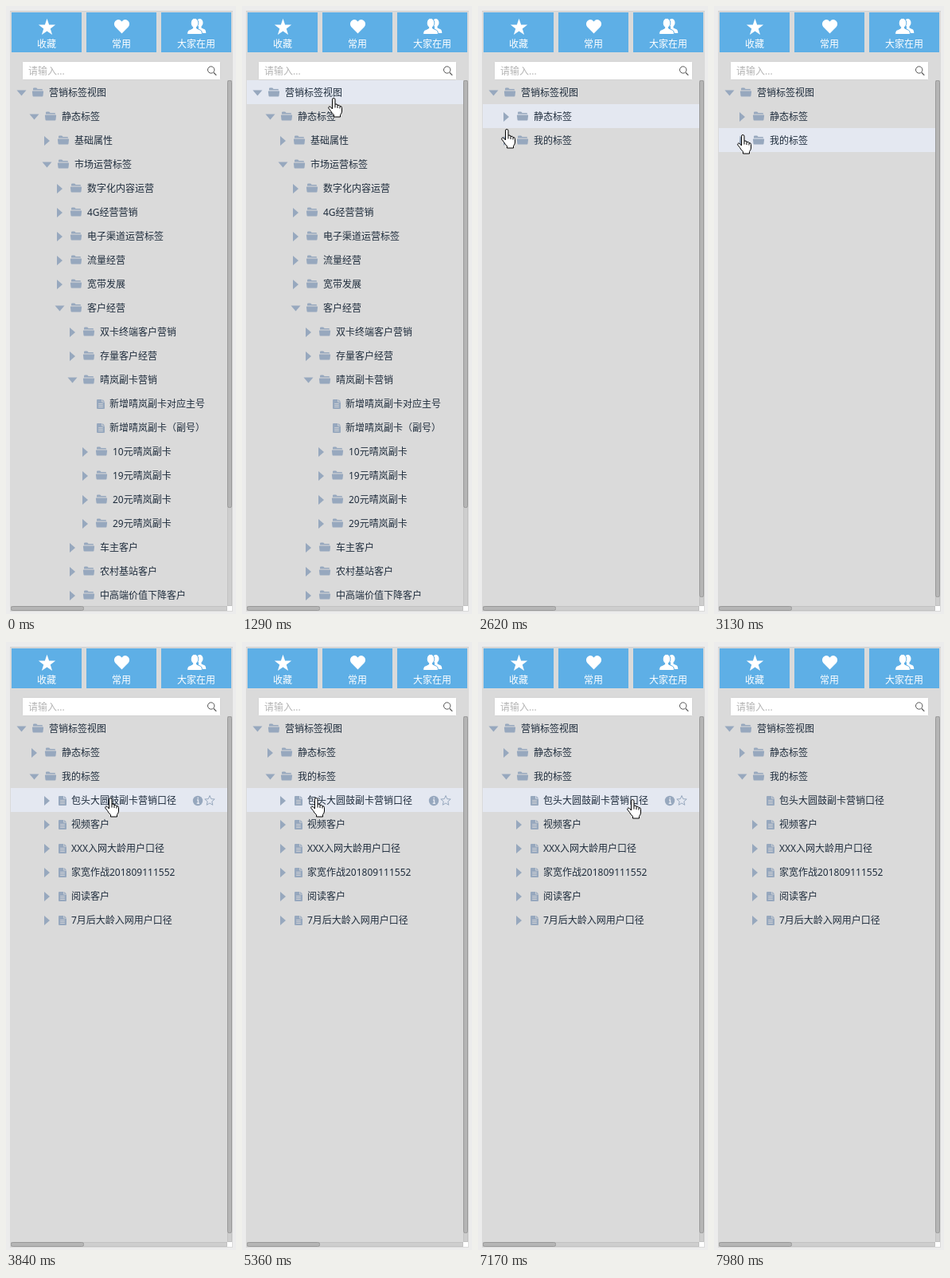
Animation, 289 px wide and 762 px high, one loop 9890 ms. Source, as an HTML page:

```html
<!DOCTYPE html>
<html lang="zh-CN">
<head>
<meta charset="utf-8">
<title>标签树</title>
<style>
  html, body { margin: 0; width: 100%; height: 100%; overflow: hidden; background: #ececec; }
  svg { display: block; width: 100vw; height: 100vh; }
  text { font: 12px "Noto Sans", "Noto Sans CJK SC", "Noto Sans CJK JP", sans-serif; fill: #1f2d3d; }
  .icon { fill: #97a8be; }
  .button text { fill: #fff; text-anchor: middle; }
  .button path, .button ellipse { fill: #fff; }
  .bar { fill: #b5b5b5; stroke: #999; }
  .track { fill: #cecece; stroke: #c2c2c2; }
</style>
</head>
<body>
<svg viewBox="0 0 289 762">
  <defs>
    <clipPath id="view"><rect x="6" y="93" width="272" height="659"/></clipPath>
    <clipPath id="staticClip"><rect id="staticBox" x="0" y="153" width="289" height="690"/></clipPath>
    <clipPath id="mineClip"><rect id="mineBox" x="0" y="30" width="289" height="0"/></clipPath>
    <g id="folder" class="icon">
      <path d="M1 3V1.2Q1 0 2.2 0H5.2L6.6 1.5H12Q13 1.5 13 2.5V3Z"/>
      <path d="M.6 4H13.4Q14.2 4 14.1 4.8L13.5 10Q13.4 11 12.4 11H1.6Q.6 11 .5 10L-.1 4.8Q-.2 4 .6 4Z"/>
    </g>
    <g id="file">
      <path class="icon" d="M1 0H6.3V3.6H10V11Q10 12 9 12H1Q0 12 0 11V1Q0 0 1 0ZM7.2 0L10 2.8H7.2Z"/>
      <path d="M2.2 5.5H7.8M2.2 7.5H7.8M2.2 9.5H7.8" stroke="#dadada" stroke-width=".8"/>
    </g>
  </defs>

  <rect x="5" y="7" width="280" height="752" fill="#dadada"/>
  <path d="M5 6.5H285" stroke="#d0d0d0"/>

  <g id="buttons" class="button"></g>

  <rect x="20.5" y="69.5" width="249" height="23" rx="1" fill="#fff" stroke="#d3d3d3"/>
  <text x="28" y="86" style="fill:#b4b4b4">请输入...</text>
  <path d="M261 83.5L264.3 86.8" stroke="#555" stroke-width="1.2"/>
  <circle cx="257.7" cy="80" r="4.2" fill="none" stroke="#555"/>

  <g clip-path="url(#view)">
    <rect id="hover" x="6" width="272" height="30" fill="#e4e8f1"/>
    <g id="top"></g>
    <g id="staticRows" clip-path="url(#staticClip)"></g>
    <g id="mine">
      <g id="mineHead"></g>
      <g id="mineRows" clip-path="url(#mineClip)"></g>
    </g>
    <g id="tools">
      <circle class="icon" cx="241" cy="199" r="6.2"/>
      <path d="M240 198H241.5V202M239.7 202.3H243M240.5 195.5H242" fill="none" stroke="#e4e8f1" stroke-width="1.4"/>
      <path id="favorite" fill="none" stroke="#97a8be"/>
    </g>
  </g>

  <rect class="track" x="278.5" y="93.5" width="5" height="658"/>
  <rect class="track" x="6.5" y="752.5" width="271" height="5"/>
  <rect x="278" y="752" width="6" height="6" fill="#fff"/>
  <rect class="bar" id="thumb" x="278.5" y="93.5" width="5" rx="2"/>
  <rect class="bar" x="6.5" y="752.5" width="91" height="5" rx="2"/>

  <g id="hand" stroke="#000" stroke-linejoin="round">
    <path fill="#fff" d="M5.5 14V2.2Q5.5 .5 7.2 .5T9 2.2V8.2Q11.8 7.2 12 9.4Q14.6 8.6 15 10.6Q17.4 10.2 17.5 12.5V17Q17.5 19 15.5 21.5V24H7.5V21.5Q5 19.5 3.5 16.5L.9 13.2Q.2 11.6 1.6 11Q3 10.4 5.5 14Z"/>
    <path fill="none" d="M9 8.2V12.5M12 9.4V13M15 10.6V13.5"/>
  </g>
</svg>
<script>
const LOOP = 9890, ROW = 30, TOP = 93, STATIC_H = 23 * ROW, MINE_H = 6 * ROW;
const $ = id => document.getElementById(id);
const set = (id, attrs) => { for (const k in attrs) $(id).setAttribute(k, attrs[k]); };
const show = (id, on) => set(id, { visibility: on ? 'visible' : 'hidden' });

function star(cx, cy, r, inner) {
  const points = [];
  for (let i = 0; i < 10; i++) {
    const a = i * Math.PI / 5, d = i % 2 ? r * inner : r;
    points.push((cx + d * Math.sin(a)).toFixed(2) + ' ' + (cy - d * Math.cos(a)).toFixed(2));
  }
  return 'M' + points.join('L') + 'Z';
}

const button = (x, label, icon) =>
  `<rect x="${x}" y="8" width="88" height="50" fill="#5eafe6"/>${icon}<text x="${x + 44}" y="52">${label}</text>`;

const arrow = (x, y, angle) => `translate(${x} ${y}) rotate(${angle})`;

// kind: 'open' or 'shut' folder, 'leaf' file, 'file' with an arrow
function row(y, level, kind, label, id = '') {
  const x = 16 * level, isFile = kind === 'leaf' || kind === 'file';
  const tri = kind === 'leaf' ? '' :
    `<path ${id && `id="${id}"`} class="icon" d="M-3.5 -6L3.5 0L-3.5 6Z" transform="${arrow(x + 19.5, y + 16, kind === 'open' ? 90 : 0)}"/>`;
  const icon = isFile ? `<use href="#file" x="${x + 34}" y="${y + 10}"/>` : `<use href="#folder" x="${x + 33}" y="${y + 9.5}"/>`;
  return `${tri}${icon}<text x="${x + (isFile ? 50 : 54)}" y="${y + 20}">${label}</text>`;
}

const staticTree = [
  [2, 'shut', '基础属性'], [2, 'open', '市场运营标签'],
  [3, 'shut', '数字化内容运营'], [3, 'shut', '4G经营营销'], [3, 'shut', '电子渠道运营标签'],
  [3, 'shut', '流量经营'], [3, 'shut', '宽带发展'], [3, 'open', '客户经营'],
  [4, 'shut', '双卡终端客户营销'], [4, 'shut', '存量客户经营'], [4, 'open', '晴岚副卡营销'],
  [5, 'leaf', '新增晴岚副卡对应主号'], [5, 'leaf', '新增晴岚副卡（副号）'],
  ...[10, 19, 20, 29].map(n => [5, 'shut', n + '元晴岚副卡']),
  [4, 'shut', '车主客户'], [4, 'shut', '农村基站客户'], [4, 'shut', '中高端价值下降客户']
];
const mineTree = ['包头大圆鼓副卡营销口径', '视频客户', 'XXX入网大龄用户口径',
  '家宽作战201809111552', '阅读客户', '7月后大龄入网用户口径'];

$('buttons').innerHTML =
  button(7, '收藏', `<path d="${star(51.5, 27, 11.2, .4)}"/>`) +
  button(101, '常用', '<path d="M145.5 34.5L137.3 26.3Q134.6 22.5 137.2 19Q141.5 15 145.5 19.5Q149.5 15 153.8 19Q156.4 22.5 153.7 26.3Z"/>') +
  button(195, '大家在用',
    '<ellipse cx="243.5" cy="21" rx="4" ry="5"/><path d="M242 24H245.5V27.5L250 29.5Q251.3 30.5 251.3 34H242Z"/>' +
    '<g stroke="#5eafe6"><path d="M234.5 25H239.5V28L244.5 30.3Q246.5 31.3 246.5 35.5H227.5Q227.5 31.3 229.5 30.3L234.5 28Z"/>' +
    '<ellipse cx="237" cy="21.3" rx="4.8" ry="6"/></g><path d="M235.2 24H238.8V29H235.2Z"/>');
$('top').innerHTML = row(TOP, 0, 'open', '营销标签视图') + row(TOP + ROW, 1, 'open', '静态标签', 'staticArrow');
$('staticRows').innerHTML = staticTree.map((r, i) => row(TOP + (i + 2) * ROW, ...r)).join('');
$('mineHead').innerHTML = row(0, 1, 'shut', '我的标签', 'mineArrow');
$('mineRows').innerHTML = mineTree.map((s, i) => row((i + 1) * ROW, 2, 'file', s, i ? '' : 'emptyArrow')).join('');
set('favorite', { d: star(256, 199, 6.5, .45) });

// The screen is sampled in bursts: first change, last change, number of changes
const bursts = [[870, 1680, 7], [2050, 2890, 7], [3130, 3400, 3], [3710, 4100, 4],
  [4660, 5660, 8], [6060, 7020, 8], [7170, 7980, 7]];

function sample(t) {
  let shown = 0;
  for (const [from, to, n] of bursts) {
    if (t < from) break;
    const step = (to - from) / (n - 1);
    shown = from + step * Math.min(n - 1, Math.floor((t - from) / step + .15));
  }
  return shown;
}

// Pointer path: time, x, y
const path = [[870, 272, 97], [1005, 218, 101], [1275, 108, 115], [1410, 70, 124], [1680, 29, 138],
  [2050, 29, 140], [2610, 29, 154], [2890, 29, 161], [3400, 29, 161], [3710, 75, 187],
  [3840, 124, 195], [3970, 146, 200], [4100, 155, 202], [4660, 150, 201], [5374, 86, 195],
  [5660, 83, 193], [6060, 90, 194], [7020, 211, 200], [7170, 187, 197], [7845, 20, 200]];

function pointer(t) {
  if (t < path[0][0] || t > 7900) return null;
  const i = path.findIndex(p => p[0] >= t);
  if (i < 1) return path[0].slice(1);
  const [t0, x0, y0] = path[i - 1], [t1, x1, y1] = path[i], k = (t - t0) / (t1 - t0);
  return [Math.round(x0 + (x1 - x0) * k), Math.round(y0 + (y1 - y0) * k)];
}

function ease(t, start) {
  const k = Math.max(0, Math.min(1, (t - start) / 300));
  return k * k * (3 - 2 * k);
}

function draw(t) {
  const closing = ease(t, 2030), opening = ease(t, 3090);
  const height = STATIC_H * (1 - closing), at = pointer(t);
  const hovered = at ? Math.floor((at[1] - 96) / ROW) : -1;

  set('staticBox', { height });
  set('staticArrow', { transform: arrow(35.5, TOP + ROW + 16, 90 * (1 - closing)) });
  set('mine', { transform: `translate(0 ${TOP + 2 * ROW + height})` });
  set('mineBox', { height: MINE_H * opening });
  set('mineArrow', { transform: arrow(35.5, 16, 90 * opening) });
  show('emptyArrow', t < 5500);

  const content = 3 * ROW + height + MINE_H * opening;
  set('thumb', { height: 647 * Math.min(1, 645 / content) });

  show('hover', hovered >= 0);
  set('hover', { y: TOP + Math.max(0, hovered) * ROW });
  show('tools', hovered === 3);
  show('hand', at);
  if (at) set('hand', { transform: `translate(${at})` });
}

const start = performance.now();
function frame() {
  draw(sample((performance.now() - start) % LOOP));
  requestAnimationFrame(frame);
}
frame();
</script>
</body>
</html>
```
